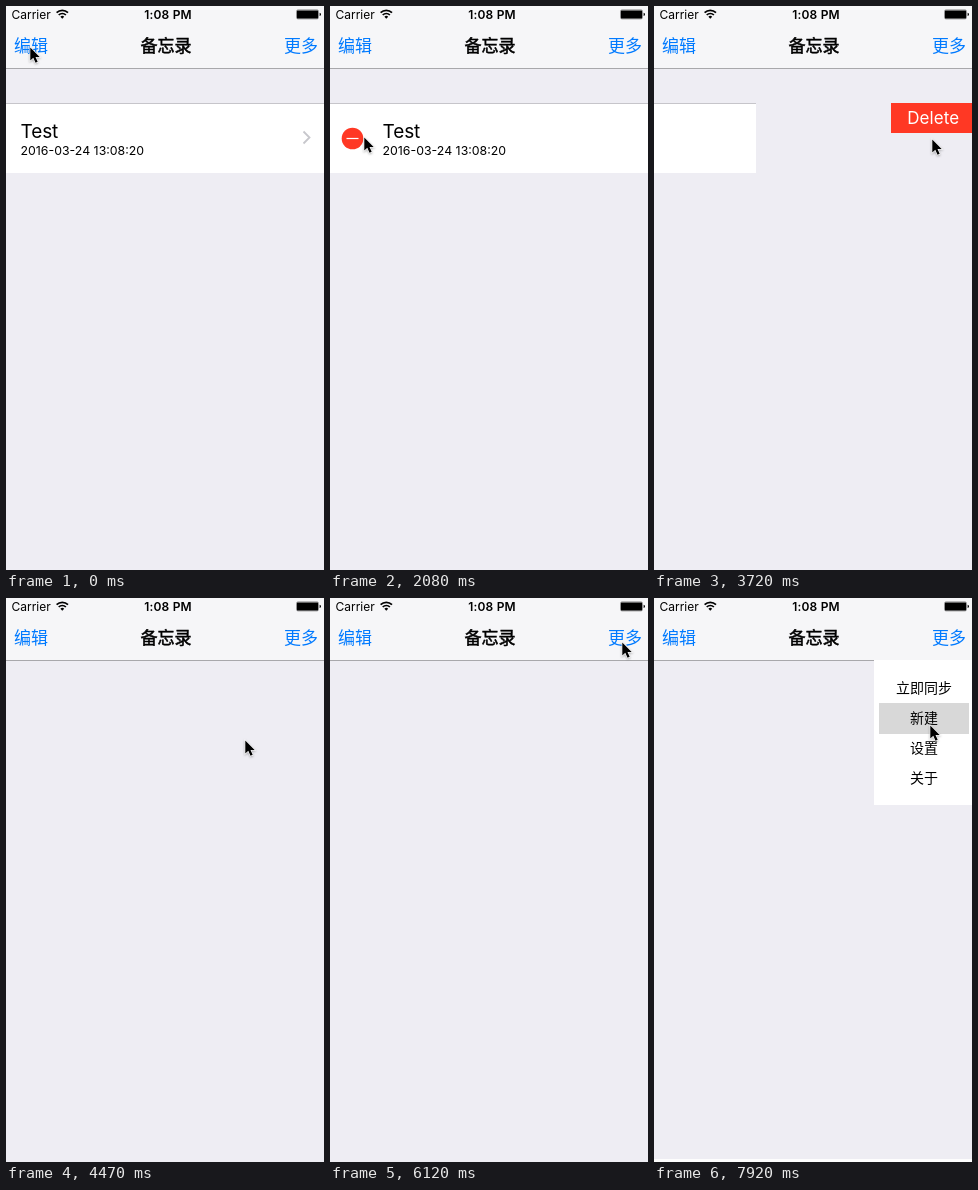
These frames come from a looping animation (318x564 px, 8000 ms). An HTML page:

```html
<!DOCTYPE html>
<html lang="zh-CN">
<head>
<meta charset="utf-8">
<title>备忘录</title>
<style>
  html, body { margin: 0; width: 100%; height: 100%; overflow: hidden; background: #eeedf3; }
  svg { display: block; width: 318px; height: 564px; font-family: Inter, sans-serif; }
  .cjk { font-family: "Noto Sans CJK SC", "Noto Sans CJK", sans-serif; font-size: 17px; }
  .link { fill: #007aff; }
  .mid { text-anchor: middle; }
  .status { font-size: 12px; }
  #title { stroke: #000; stroke-width: .5; }
  #menu .cjk { font-size: 14px; }
  #cursor { filter: drop-shadow(0 1px 1px rgba(0, 0, 0, .3)); }
</style>
</head>
<body>
<svg viewBox="0 0 318 564">
  <rect width="318" height="564" fill="#eeedf3"/>

  <g id="item">
    <g id="del">
      <rect id="delBox" x="237" y="97" width="81" height="70" fill="#ff3824"/>
      <text id="delText" class="mid" x="279.2" font-size="17" letter-spacing=".1" fill="#fff">Delete</text>
    </g>
    <g id="row">
      <rect y="97" width="318" height="70" fill="#fff"/>
      <rect y="97" width="318" height="1" fill="#c6c5ca"/>
    </g>
    <g id="content">
      <g id="minus">
        <circle cx="-15.5" cy="132.5" r="10.8" fill="#ff3824"/>
        <path d="M-21.5 132.5h12" stroke="#fff" stroke-width="1.2"/>
      </g>
      <text x="14.5" y="132" font-size="19" letter-spacing="-.1">Test</text>
      <text x="14.5" y="148.8" font-size="12.35">2016-03-24 13:08:20</text>
      <path id="chevron" d="M297.5 125.500l6 6-6 6" fill="none" stroke="#c7c7cc" stroke-width="1.8"/>
    </g>
  </g>

  <rect width="318" height="62" fill="#f6f6f8"/>
  <rect y="62" width="318" height="1" fill="#a8a8ab"/>
  <text class="status" x="5.5" y="12.5">Carrier</text>
  <path d="M50.6 6.700a8.200 8.200 0 0 1 11.400 0M52.700 9a5.200 5.200 0 0 1 7.200 0" fill="none" stroke="#000" stroke-width="1.7"/>
  <path d="M56.3 12.700l-1.900-2a2.700 2.700 0 0 1 3.800 0z"/>
  <text class="status mid" x="162" y="12.5" font-weight="600" letter-spacing=".2">1:08 PM</text>
  <rect x="290.5" y="3.900" width="22" height="9" rx="1.5" fill="none" stroke="#000" stroke-width=".8" opacity=".5"/>
  <rect x="291" y="4.400" width="21" height="8" rx=".6"/>
  <path d="M313.6 6.700q1.400 .4 1.400 1.700t-1.400 1.700z"/>
  <text id="edit" class="cjk link" x="8" y="46.300">编辑</text>
  <text id="title" class="cjk mid" x="160" y="46.300">备忘录</text>
  <text id="more" class="cjk link" x="278" y="46.300">更多</text>

  <g id="menu">
    <rect x="220" y="62" width="98" height="145" fill="#fff"/>
    <rect id="picked" x="225" y="105" width="90" height="31" fill="#d8d8d8"/>
  </g>
  <rect id="sheet" y="561" width="318" height="3" fill="#fdfdfd"/>

  <path id="cursor" d="M.3 .5v13l3-2.800 2.200 5 2.200-.9-2.200-4.900h4.200z" stroke="#fff" stroke-width="1.300" paint-order="stroke"/>
</svg>
<script>
const LOOP = 8000;
const $ = id => document.getElementById(id);
const set = (id, name, value) => $(id).setAttribute(name, value);
const show = (id, on) => set(id, "visibility", on ? "visible" : "hidden");
const shift = (id, x, y = 0) => set(id, "transform", `translate(${x} ${y})`);
const progress = (t, start, end) => Math.min(1, Math.max(0, (t - start) / (end - start)));
const easeOut = p => 1 - (1 - p) ** 3;
const easeInOut = p => p * p * (3 - 2 * p);

["立即同步", "新建", "设置", "关于"].forEach((label, i) => {
  $("menu").insertAdjacentHTML("beforeend",
    `<text class="cjk mid" x="270" y="${95.2 + 30 * i}">${label}</text>`);
});

// pointer moves: start, end, x, y
const moves = [
  [1500, 1950, 37, 147], [1950, 2080, 34, 131], [2080, 2380, 24, 132],
  [2680, 2980, 162, 145], [2980, 3430, 278, 133],
  [4170, 4470, 239, 142], [4470, 5100, 24, 41], [5370, 6000, 292, 44],
  [6420, 6870, 284, 101], [6870, 7020, 281, 91], [7320, 7620, 276, 127]
];

function pointer(t) {
  let x = 24, y = 41;
  for (const [start, end, toX, toY] of moves) {
    const k = easeInOut(progress(t, start, end));
    x += (toX - x) * k;
    y += (toY - y) * k;
  }
  return [x, y];
}

// the screen refreshes every 150 ms
function tick(t) {
  const base = t < 2080 ? 0 : t < 3720 ? 2080 : 3720;
  return base + Math.floor((t - base) / 150) * 150;
}

function draw(now) {
  const t = tick(now % LOOP);
  const pressed = start => t >= start && t < start + 150 ? 0.3 : 1;

  const editing = easeOut(progress(t, 1420, 1750));
  const swipe = easeOut(progress(t, 2600, 2930));
  const removing = t >= 3720;
  const rowX = removing ? -216 : -76 * swipe;
  const boxH = removing ? 30 : 70;

  $("item").style.display = t < 3870 ? "" : "none";
  shift("row", rowX);
  shift("content", 38 * editing + (removing ? rowX : -78 * swipe));
  set("minus", "opacity", editing);
  set("chevron", "opacity", 1 - editing);
  show("del", swipe > 0);
  set("delBox", "height", boxH);
  set("delText", "y", 103 + boxH / 2);

  set("edit", "opacity", Math.min(pressed(1350), pressed(5220)));
  set("more", "opacity", pressed(6270));
  show("menu", t >= 6420);
  show("picked", t >= 7920);
  show("sheet", t >= 7920);
  shift("cursor", ...pointer(t));
}

function loop() {
  draw(performance.now());
  requestAnimationFrame(loop);
}
loop();
</script>
</body>
</html>
```
